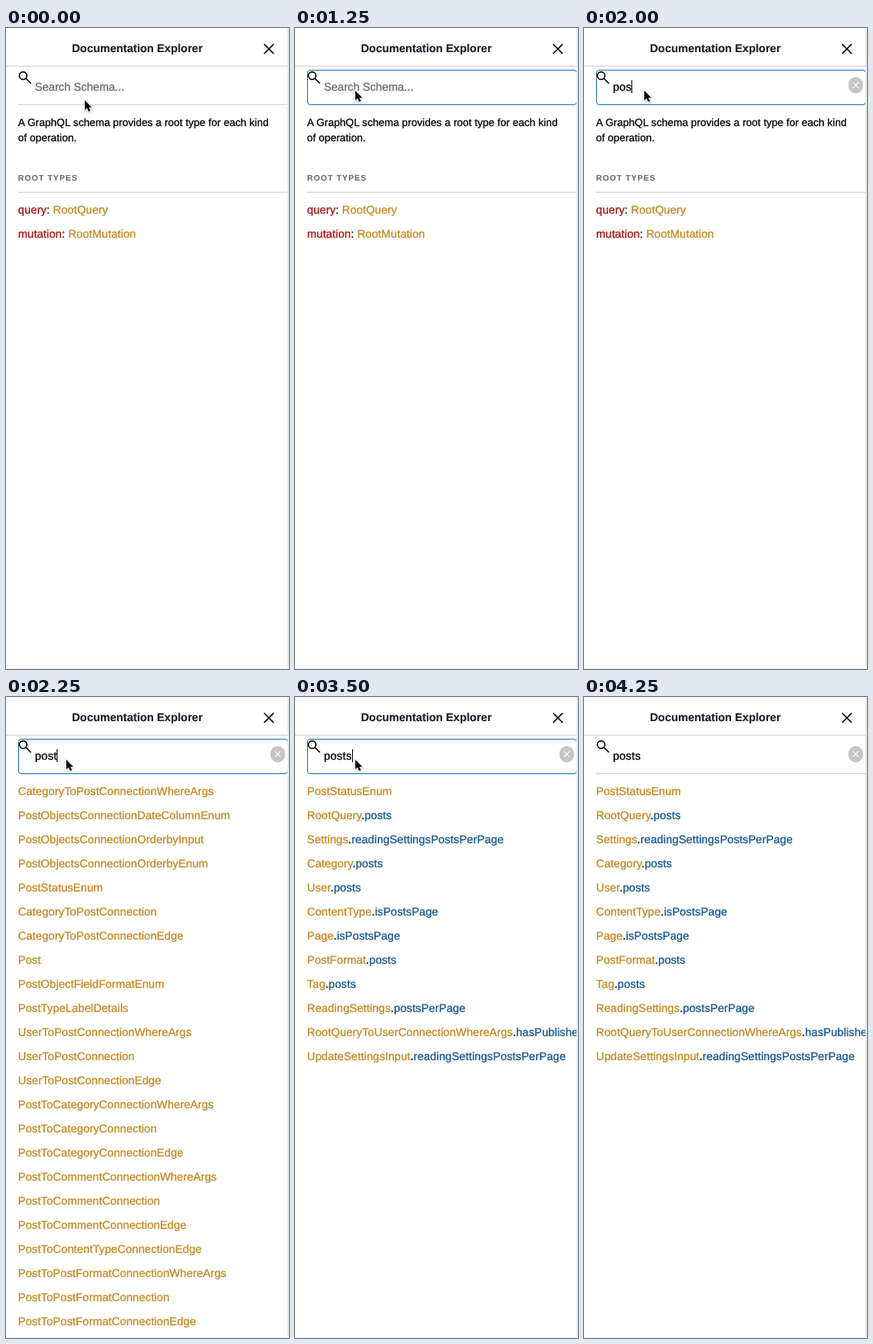
Recreate the animation shown at these times as an HTML page. Size 352x798 px, loop 4750 ms.

```html
<!DOCTYPE html>
<html lang="en">
<head>
<meta charset="utf-8">
<title>Documentation Explorer</title>
<style>
html, body { margin: 0; width: 100%; height: 100%; overflow: hidden; background: #fff; }
svg { display: block; width: 352px; height: 798px; }
text { font: 14px "Liberation Sans", Arial, sans-serif; letter-spacing: .09px; color: #141823; text-rendering: geometricPrecision; white-space: pre; }
text, tspan { fill: currentColor; stroke: currentColor; stroke-width: .28; }
.title { font-weight: bold; letter-spacing: 0; stroke-width: .1; }
.intro { font-size: 13px; letter-spacing: .045px; color: #000; }
.section { font-size: 10px; font-weight: bold; letter-spacing: 1px; color: #6b6b6b; stroke-width: .1; }
.keyword { color: #ab1008; }
.type { color: #c2861a; }
.field { color: #11568f; }
#hint { letter-spacing: 0; color: #686868; }
#typed { letter-spacing: .25px; color: #000; }
.rule { fill: #d0d0d0; }
.edge { fill: #ececec; }
.icon { fill: none; stroke: #000; stroke-width: 1.6; }
</style>
</head>
<body>
<svg viewBox="0 0 352 798">
  <text class="title" x="82" y="30">Documentation Explorer</text>
  <path class="icon" d="M321 20l12 12m0-12l-12 12"/>
  <rect class="rule" y="47" width="350" height="1"/>

  <rect id="line" class="rule" x="15" y="95" width="335" height="1"/>
  <rect id="focus" x="15.5" y="52.5" width="335" height="43" rx="3.5" fill="#fff" stroke="#1873b0"/>
  <g class="icon"><circle cx="21.3" cy="59.3" r="4.7"/><path d="M24.7 62.7l6.3 6.3"/></g>
  <text id="hint" x="36" y="78">Search Schema...</text>
  <text id="typed" x="36" y="78"></text>
  <rect id="caret" y="65" width="1" height="16"/>
  <g id="clear">
    <rect x="329" y="61" width="18" height="20.5" rx="9" fill="#c6c6c6"/>
    <path d="M334.5 67.7l7 7m0-7l-7 7" stroke="#fff" stroke-width="1.2"/>
  </g>

  <g id="root">
    <text class="intro" x="15" y="122">A GraphQL schema provides a root type for each kind</text>
    <text class="intro" x="15" y="141">of operation.</text>
    <text class="section" x="15" y="190">ROOT TYPES</text>
    <rect class="rule" x="15" y="204" width="335" height="1"/>
    <text x="15" y="231"><tspan class="keyword">query</tspan>: <tspan class="type">RootQuery</tspan></text>
    <text x="15" y="261"><tspan class="keyword">mutation</tspan>: <tspan class="type">RootMutation</tspan></text>
  </g>
  <g id="post"></g>
  <g id="posts"></g>

  <rect class="edge" x="350" width="2" height="798"/>
  <rect class="edge" y="797" width="352" height="1"/>
  <path id="pointer" d="M0 0V12L2.8 9.5L4.8 14L7 13.1L5 8.7H8.7Z" stroke="#fff" stroke-width="1.6" paint-order="stroke"
    style="filter: drop-shadow(0 1px 1px #0004)"/>
</svg>
<script>
const LOOP = 4750;
const $ = id => document.getElementById(id);

const connection = (name, kinds) => kinds.map(kind => name + "Connection" + kind);
const ALL = ["WhereArgs", "", "Edge"];
const results = {
  post: [
    "CategoryToPostConnectionWhereArgs",
    ...connection("PostObjects", ["DateColumnEnum", "OrderbyInput", "OrderbyEnum"]),
    "PostStatusEnum",
    ...connection("CategoryToPost", ["", "Edge"]),
    "Post", "PostObjectFieldFormatEnum", "PostTypeLabelDetails",
    ...connection("UserToPost", ALL),
    ...connection("PostToCategory", ALL),
    ...connection("PostToComment", ALL),
    "PostToContentTypeConnectionEdge",
    ...connection("PostToPostFormat", ALL)
  ],
  posts: [
    "PostStatusEnum", "RootQuery.posts", "Settings.readingSettingsPostsPerPage",
    "Category.posts", "User.posts", "ContentType.isPostsPage", "Page.isPostsPage",
    "PostFormat.posts", "Tag.posts", "ReadingSettings.postsPerPage",
    "RootQueryToUserConnectionWhereArgs.hasPublishedPosts",
    "UpdateSettingsInput.readingSettingsPostsPerPage"
  ]
};

for (const id in results) {
  $(id).innerHTML = results[id].map((entry, i) => {
    const [type, field] = entry.split(".");
    const tail = field ? `.<tspan class="field">${field}</tspan>` : "";
    return `<text x="15" y="${122 + 30 * i}"><tspan class="type">${type}</tspan>${tail}</text>`;
  }).join("");
}

// Each track lists [start time, value]; a value holds until the next one.
const pointerTrack = [[0, [98, 90]], [250, [80, 90]], [500, [77, 86]], [750, [75, 78]], [4000, null]];
const textTrack = [[0, ""], [1750, "po"], [2000, "pos"], [2250, "post"], [2500, "posts"]];
const caretTrack = [[0, false], [750, true], [1250, false], [1750, true], [3000, false], [3500, true], [4000, false]];
const at = (track, t) => track.findLast(([start]) => start <= t)[1];
const show = (id, on) => $(id).setAttribute("visibility", on ? "visible" : "hidden");

function draw() {
  const t = performance.now() % LOOP;
  const text = at(textTrack, t);
  const pos = at(pointerTrack, t);
  const focused = t >= 750 && t < 4250;

  $("typed").textContent = text;
  $("caret").setAttribute("x", 36 + Math.round(text ? $("typed").getComputedTextLength() : 0));
  show("caret", at(caretTrack, t));
  show("hint", !text);
  show("clear", text);
  show("focus", focused);
  show("line", !focused);
  show("root", text.length < 4);
  show("post", text === "post");
  show("posts", text === "posts");
  show("pointer", pos);
  if (pos) $("pointer").setAttribute("transform", `translate(${pos})`);
  requestAnimationFrame(draw);
}
draw();
</script>
</body>
</html>
```
